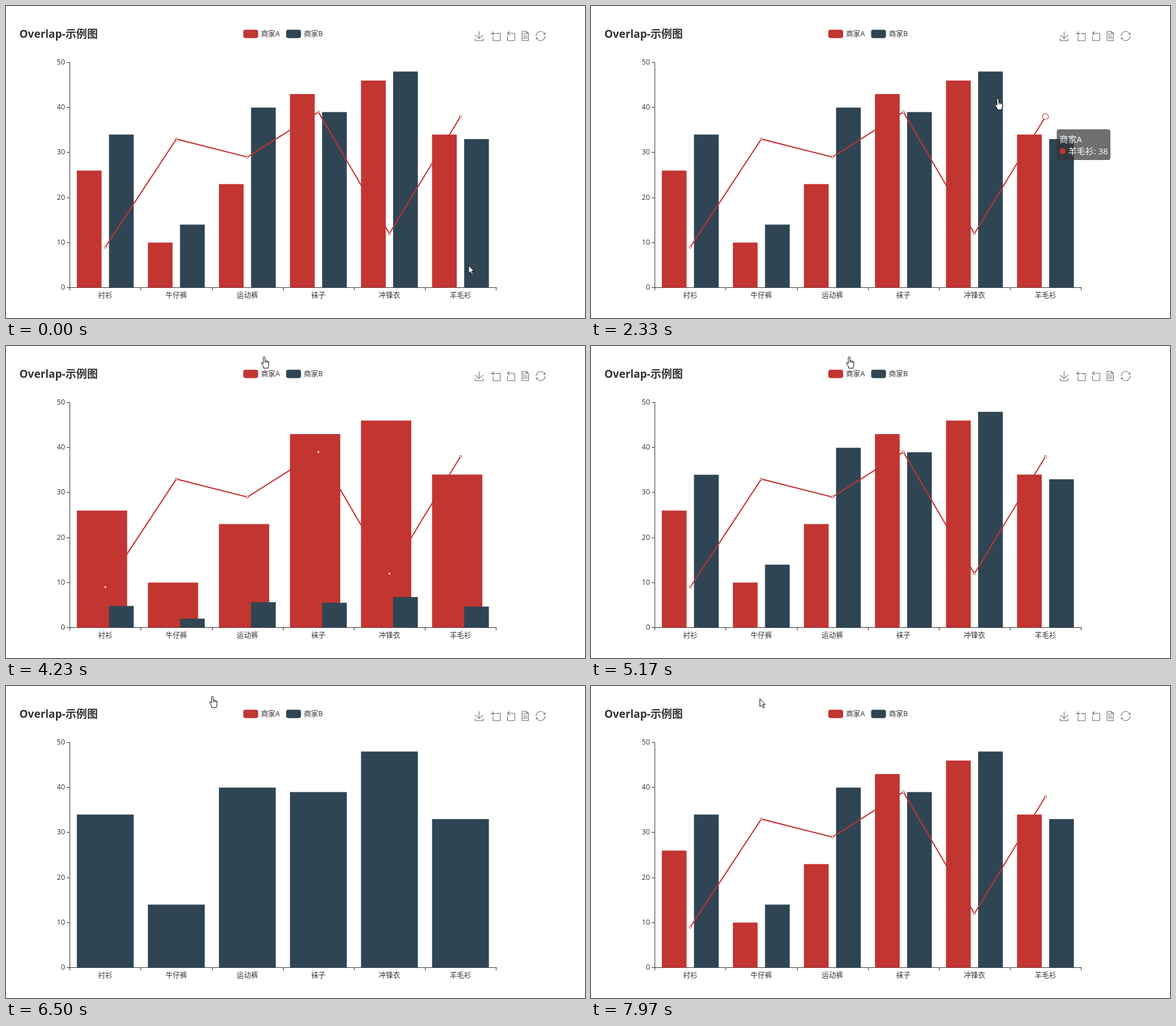
Animation of 1020x549 px, one loop 8 s. Source, as an HTML page:

```html
<!DOCTYPE html>
<html lang="zh-CN">
<head>
<meta charset="utf-8">
<title>Overlap</title>
<style>
  html, body { margin: 0; width: 100%; height: 100%; overflow: hidden; background: #fff; }
  svg { display: block; width: 1020px; height: 549px; }
  text { font-family: "Open Sans", "Noto Sans CJK SC", "Noto Sans CJK", sans-serif; font-size: 12.6px; fill: #333; }
  .title { font-size: 19px; font-weight: bold; }
  .tip text { font-size: 15px; fill: #fff; }
  .axis { stroke: #333; fill: none; }
  .icons path { stroke: #666; fill: none; stroke-width: 1.05px; vector-effect: non-scaling-stroke; }
</style>
</head>
<body>
<svg id="stage" viewBox="0 0 1020 549" xmlns="http://www.w3.org/2000/svg"></svg>
<script>
const LOOP = 8000;
const RED = '#c23531', NAVY = '#2f4554', RED_LIT = '#d53a35', NAVY_LIT = '#344c5c', OFF = '#ccc';
const LEFT = 112.3, WIDTH = 750.9, BASE = 495.5, UNIT = 7.92;
const STEP = WIDTH / 6, PAD = STEP * 0.1, FULL = STEP * 0.8, HALF = FULL / 2.3, SECOND = PAD + HALF * 1.3;
const names = ['衬衫', '牛仔裤', '运动裤', '袜子', '冲锋衣', '羊毛衫'];
const valuesA = [26, 10, 23, 43, 46, 34];
const valuesB = [34, 14, 40, 39, 48, 33];
const valuesLine = [9, 33, 29, 39, 12, 38];

// Chart updates after clicks on the legend, which itself reacts a little earlier
const B_OFF = 3160, B_ON = 4209, A_OFF = 5630, A_ON = 6502, LEAD = 10;

const clamp = p => Math.max(0, Math.min(1, p));
const linear = p => p;
const smooth = p => p * p * (3 - 2 * p);
const cubicOut = p => 1 - (1 - p) ** 3;
const quintOut = p => 1 - (1 - p) ** 5;
const expoOut = p => p >= 1 ? 1 : 1 - 2 ** (-10 * p);
const elasticOut = p => p <= 0 ? 0 : p >= 1 ? 1 : 2 ** (-10 * p) * Math.sin((p - 0.1) * 5 * Math.PI) + 1;

// Each step is [start, goal, duration, easing]
const track = (t, from, steps) => steps.reduce(
  (v, [at, to, dur = 1, ease = linear]) => t < at ? v : v + (to - v) * ease(clamp((t - at) / dur)), from);
const within = (t, a, b) => t >= a && t < b;

const stage = document.getElementById('stage');
function set(el, attrs) {
  for (const key in attrs) el.setAttribute(key, attrs[key]);
  return el;
}
function add(tag, attrs = {}, parent = stage, content) {
  const el = set(document.createElementNS('http://www.w3.org/2000/svg', tag), attrs);
  if (content !== undefined) el.textContent = content;
  parent.appendChild(el);
  return el;
}
const show = (el, on) => set(el, { visibility: on ? 'visible' : 'hidden' });
const yOf = v => BASE - v * UNIT;
const centre = i => LEFT + STEP * (i + 0.5);

add('rect', { width: 1020, height: 549, fill: '#fff' });
add('text', { class: 'title', x: 23.5, y: 56 }, stage, 'Overlap-示例图');

function legendItem(x, label) {
  return {
    box: add('rect', { x, y: 41.7, width: 26.2, height: 14.7, rx: 3.8 }),
    label: add('text', { x: x + 31.2, y: 53 }, stage, label)
  };
}
const legendA = legendItem(418, '商家A');
const legendB = legendItem(493.5, '商家B');

const icons = add('g', { class: 'icons' });
[
  [833.6, 29.6, 29, 'M5,23L29,45L54,23M5,44V58H54V44M29,45V0'],
  [862.5, 29, 29, 'M0,13.5H27M13.5,27V0M32,13.5H58V58H13.5V32'],
  [889.7, 32, 30, 'M22,1.5L10,13.5L22,26M10,13.5H55V58H10V32'],
  [914.8, 31.3, 30, 'M11.5,2V58H51V15L38.5,2ZM38.5,2V15H51M17.5,17.3H33M17.5,29.5H45M17.5,41.7H45'],
  [941.9, 30, 30, 'M47,19H57V9M56,20C52,9 40,1 27,2C13,4 2,16 2,31M13,41H3V51M4,40C8,51 20,59 33,58C47,56 58,44 58,29']
].forEach(([x, cx, cy, d]) =>
  add('path', { d, transform: `translate(${x} 52.8) scale(.285) translate(${-cx} ${-cy})` }, icons));

let axis = `M112.5,99V496M112,${BASE}H864.5`;
for (let v = 0; v <= 50; v += 10) {
  const y = Math.floor(yOf(v)) + 0.5;
  axis += `M107,${y}H112.5`;
  add('text', { x: 104, y: y + 3.4, 'text-anchor': 'end' }, stage, v);
}
for (let i = 0; i <= 6; i++) axis += `M${Math.round(LEFT + STEP * i) + 0.5},${BASE}v5`;
names.forEach((name, i) => add('text', { x: centre(i), y: 512.7, 'text-anchor': 'middle' }, stage, name));
add('path', { class: 'axis', d: axis });

const barsA = valuesA.map(() => add('rect'));
const barsB = valuesB.map(() => add('rect'));
const clip = add('clipPath', { id: 'reveal' }, add('defs'));
const clipRect = add('rect', { x: LEFT, y: 90, height: 420 }, clip);
const line = add('polyline', {
  points: valuesLine.map((v, i) => `${centre(i)},${yOf(v)}`).join(' '),
  fill: 'none', stroke: RED, 'stroke-width': 2.1, 'stroke-linejoin': 'bevel', 'clip-path': 'url(#reveal)'
});
const dots = valuesLine.map((v, i) =>
  add('circle', { cx: centre(i), cy: yOf(v), fill: '#fff', stroke: RED }));

const tip = add('g', { class: 'tip' });
add('rect', { width: 94.5, height: 54, rx: 4, fill: 'rgb(50,50,50)', 'fill-opacity': 0.7 }, tip);
const tipHead = add('text', { x: 5, y: 22.5 }, tip);
const tipDot = add('circle', { cx: 10.3, cy: 38.3, r: 5.2 }, tip);
const tipBody = add('text', { x: 20.3, y: 44 }, tip);

const pen = { fill: '#fff', stroke: '#000', 'stroke-width': 1, 'stroke-linejoin': 'round' };
const arrow = add('path', { ...pen, d: 'M.5,.5V14.5L3.8,11.4L6.2,16.6L8.3,15.6L6,10.6H10Z' });
const hand = add('path', {
  ...pen,
  d: 'M-1.6,11V.6a1.6,1.6 0 0 1 3.2,0V6.2q1.4,-.8 2.6,.4q1.5,-.5 2.3,.7q1.5,-.2 1.7,1.6V13q0,2 -1.2,3.6V19H-1V17' +
     'q-1,-2 -2,-3.5q-1,-1.8 -2,-3.2q.2,-1.6 1.6,-1.2ZM1.6,6.2V9.5M4.2,6.6V9.5M6.5,7.3V9.5'
});

// [start, x, y, duration]
const moves = [
  [30, 705, 310, 350], [380, 699, 238, 320], [930, 709, 197, 200], [1130, 717, 164, 600],
  [2320, 454.8, 20, 580], [5270, 363.6, 19, 300], [7700, 297, 22, 270]
];
const handTimes = [[345, 1150], [1725, 2390], [2523, 2593], [2820, 5445], [5470, 7840]];
// [from, until, series, item, value, colour]
const tips = [
  [345, 1250, '商家A', 5, 34, RED],
  [1745, 2490, '商家A', 5, 38, RED],
  [2523, 2693, '商家B', 4, 48, NAVY]
];
// [start, x, y, duration]
const tipMoves = [
  [345, 799, 294, 355], [930, 803, 288, 190], [1135, 815, 246, 400],
  [1725, 820.5, 217, 400], [2523, 722, 160, 400]
];
const along = (t, x, y, steps, ease) => [
  track(t, x, steps.map(m => [m[0], m[1], m[3], ease])),
  track(t, y, steps.map(m => [m[0], m[2], m[3], ease]))
];

function drawBars(bars, values, x, width, growth, colourOf) {
  bars.forEach((bar, i) => {
    const height = values[i] * UNIT * growth;
    set(bar, { x: LEFT + STEP * i + x, y: BASE - height, width, height, fill: colourOf(i) });
  });
}

function render(t) {
  const onA = !within(t, A_OFF, A_ON - LEAD), onB = !within(t, B_OFF, B_ON - LEAD);
  const litA = within(t, 5475, A_OFF), litB = within(t, 2820, B_OFF);

  const growA = track(t, 1, [[5930, 0], [A_ON, 1, 1000, expoOut]]);
  const widthA = track(t, HALF, [
    [B_OFF, FULL, 300, cubicOut], [B_ON, HALF, 300, cubicOut], [A_OFF, 0, 300, cubicOut], [A_ON - LEAD, HALF]]);
  drawBars(barsA, valuesA, PAD, widthA, growA,
    i => litA || (i === 5 && within(t, 345, 1150)) ? RED_LIT : RED);

  const growB = track(t, 1, [[3470, 0], [B_ON, 1, 1000, expoOut]]);
  const widthB = track(t, HALF, [
    [B_OFF, 0, 300, cubicOut], [B_ON - LEAD, HALF], [A_OFF, FULL, 300, cubicOut], [A_ON, HALF, 300, cubicOut]]);
  const xB = track(t, SECOND, [[A_OFF, PAD, 300, cubicOut], [A_ON, SECOND, 300, cubicOut]]);
  drawBars(barsB, valuesB, xB, widthB, growB,
    i => litB || (i === 4 && within(t, 2523, 2593)) ? NAVY_LIT : NAVY);

  show(line, onA);
  const reveal = track(t, 1, [[A_OFF, 0], [A_ON, 1, 1000, expoOut]]);
  set(clipRect, { width: WIDTH * reveal });
  const dotScale = track(t, 1, [[A_OFF, 0, 300, cubicOut], [A_ON, 1, 1000, expoOut]]);
  dots.forEach((dot, i) => {
    const pulse = i === 5 ? [[1745, 5.25, 400, elasticOut], [2390, 2, 400, elasticOut]] : [];
    const r = dotScale * track(t, 2, [...pulse, [5475, 5.25, 400, elasticOut], [6200, 2]]);
    set(dot, { r, 'stroke-width': Math.min(1.05, r / 2) });
    show(dot, r > 0.05);
  });

  set(legendA.box, { fill: onA ? RED : OFF });
  set(legendB.box, { fill: onB ? NAVY : OFF });
  legendA.label.style.fill = onA ? '#333' : OFF;
  legendB.label.style.fill = onB ? '#333' : OFF;

  const info = tips.find(([from, until]) => within(t, from, until));
  show(tip, info);
  if (info) {
    const [, , series, item, value, colour] = info;
    const [x, y] = along(t, 529, 352, tipMoves, quintOut);
    set(tip, { transform: `translate(${x} ${y})` });
    set(tipDot, { fill: colour });
    tipHead.textContent = series;
    tipBody.textContent = `${names[item]}: ${value}`;
  }

  const [px, py] = along(t, 814.5, 456, moves, smooth);
  const pointing = handTimes.some(([a, b]) => within(t, a, b));
  show(hand, pointing);
  show(arrow, !pointing);
  set(pointing ? hand : arrow, { transform: `translate(${px} ${py})` });
}

const begin = performance.now();
function tick() {
  render((performance.now() - begin) % LOOP);
  requestAnimationFrame(tick);
}
tick();
</script>
</body>
</html>
```
